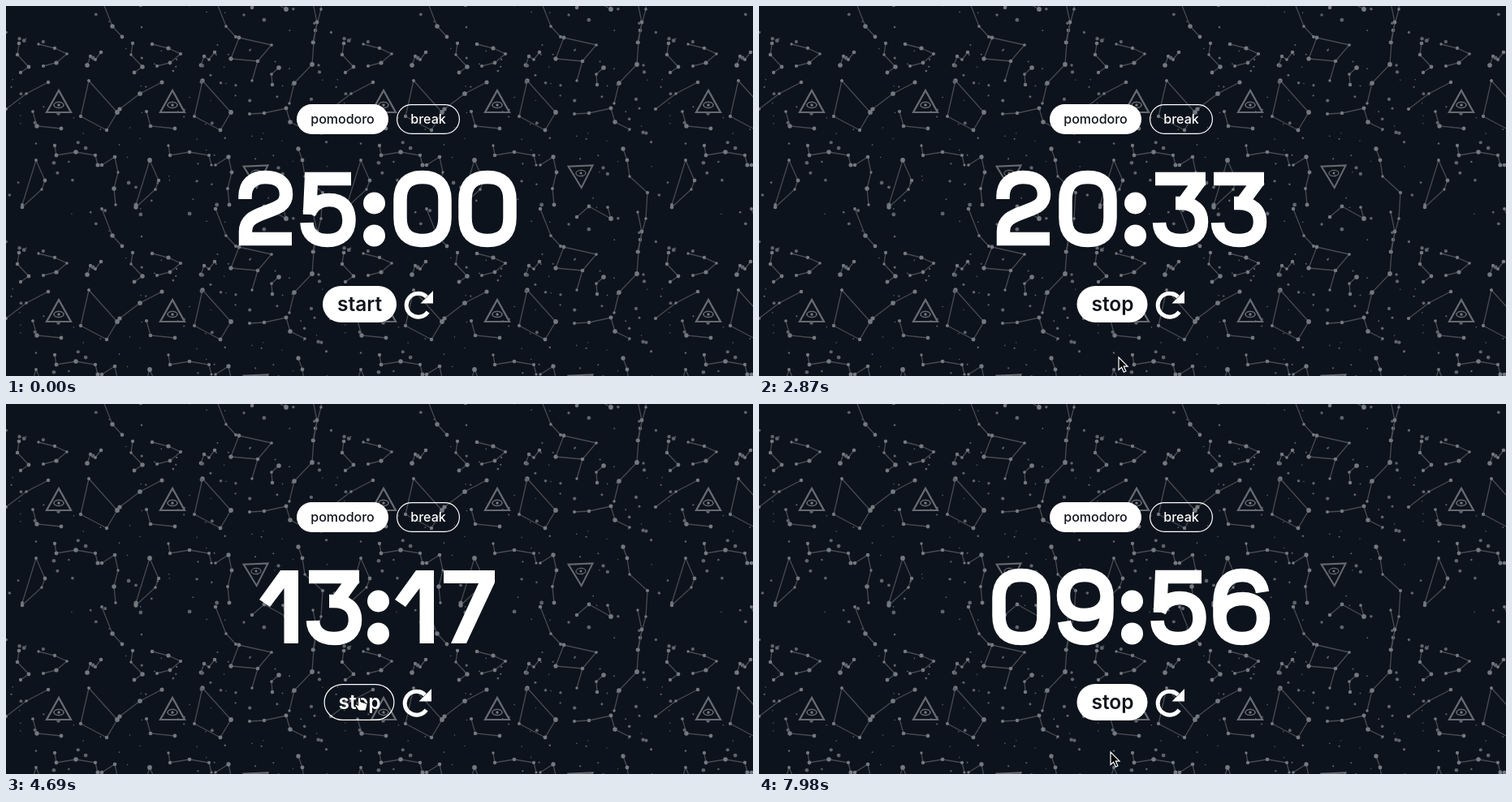
Animation of 920 by 456 pixels, one loop 8 s. Source, as an HTML page with a canvas:

```html
<!DOCTYPE html>
<html lang="en">
<head>
<meta charset="utf-8">
<title>Pomodoro timer</title>
<style>
  html, body { margin: 0; width: 100%; height: 100%; overflow: hidden; background: #0d131c; }
  canvas, svg { position: absolute; left: 0; top: 0; width: 920px; height: 456px; }
  text { font: 500 16px Inter, "Open Sans", sans-serif; text-anchor: middle; fill: #fff; }
  .dark { fill: #10141c; }
  .pill { fill: #fff; }
  .line { fill: none; stroke: #fff; stroke-width: 1.2; }
  #label { font-size: 24.5px; font-weight: 600; fill: #10141c; }
  #btn.hover #label { fill: #fff; }
  #btn.hover .pill { fill: none; stroke: #fff; stroke-width: 1.2; }
  .bold { fill: none; stroke: #fff; stroke-width: 16.5; }
  .solid { fill: #fff; fill-rule: evenodd; }
</style>
</head>
<body>
<canvas id="sky" width="920" height="456"></canvas>
<svg viewBox="0 0 920 456">
  <defs>
    <path id="g0" class="bold" d="M12.5 34C12.5 15 22 6 40 6S67.5 15 67.5 34V56C67.5 75 58 84 40 84S12.5 75 12.5 56Z"/>
    <path id="g1" class="solid" d="M49 0V90H31.5V22L14 45L1 36L27 0Z"/>
    <path id="g2" class="bold" d="M11.5 33V30C11.5 14 21 6 36.5 6S62 13 62 27C62 40 53 43 37 49C20 55 12 60 12 73V82H69"/>
    <path id="g3" class="bold" d="M5 8H67M61 9L39 39M30 38H36C53 38 62 47 62 61C62 76 52 84 36 84C20 84 10.5 76 10 62"/>
    <path id="g4" class="solid" d="M67 0V58H80V73H67V90H50V73H4V56L45 0ZM50 58V20L22 58Z"/>
    <path id="g5" class="bold" d="M66 8H17L15 52M14 51C19 39 28 34 39 34C55 34 63.5 43 63.5 59C63.5 75 53 84 37 84C21 84 12 76 11.5 62"/>
    <path id="g6" class="bold" d="M65 27C63 13 54 6 40 6C22 6 12.5 18 12.5 40V57C12.5 75 23 84 40 84C57 84 66 74 66 59C66 44 56 35 41 35C24 35 13 44 12.5 57"/>
    <use id="g9" href="#g6" transform="rotate(180 39 45)"/>
    <path id="g7" class="solid" d="M4 0H67V15L32 90H13L47 16H4Z"/>
    <g id="g8" class="bold">
      <ellipse cx="39" cy="25" rx="23.5" ry="19"/>
      <ellipse cx="39" cy="63" rx="27.5" ry="21"/>
    </g>
    <g id="colon" class="solid">
      <circle cx="18.5" cy="38" r="13.5"/>
      <circle cx="18.5" cy="78" r="13.5"/>
    </g>
  </defs>

  <rect class="pill" x="358" y="121" width="113" height="37" rx="18.5"/>
  <text class="dark" x="414.5" y="145">pomodoro</text>
  <rect class="line" x="481.6" y="121.6" width="76.8" height="35.8" rx="17.9"/>
  <text x="520" y="145">break</text>

  <g id="timer" role="timer"></g>

  <g id="btn">
    <rect id="pill" class="pill" y="345" height="45" rx="22.5"/>
    <text id="label" x="435.5" y="376"></text>
  </g>
  <g id="reset">
    <path d="M519.6 377A14.5 14.5 0 1 1 518 358.5" fill="none" stroke="#fff" stroke-width="5"/>
    <path d="M526 351V366.5H510.5Z" fill="#fff"/>
  </g>

  <g id="cursor">
    <g id="ring" class="line">
      <circle r="32.3"/>
      <circle r="29.5" opacity=".6"/>
    </g>
    <path id="arrow" d="M0 0V15.5L3.6 12.2L6.3 18.2L8.9 17L6.3 11.2H11Z" fill="#000" stroke="#fff" stroke-width="1.2"/>
    <path id="hand" d="M-1.6 1.5Q0 -.6 1.5 1.5L2 6L9 8Q10.500 9 9.500 12L8 17H-.5L-5 10.500Q-4.500 8 -1.500 10.500Z" fill="#fff" stroke="#000" stroke-width="1"/>
  </g>
</svg>
<script>
const $ = id => document.getElementById(id);

// ---- starry wallpaper: a 400 x 258 tile ----
const left = [   // appears twice per tile, 140 px apart
  [40,47, 60,52, 75,59, 62,70, 46,74],
  [16,46, 14,60, 28,75, 18,82],
  [118,-8, 131,25, 143,38],
  [100,73, 104,62, 110,66, 117,57],
  [0,127, 25,108, 52,94],
  [33,130, 38,148, 68,151],
  [102,92, 92,136, 124,153, 137,131, 102,92],
  [60,172, 62,184, 86,180, 110,184, 113,196],
  [20,245, 37,190, 48,215, 44,226, 20,248],
  [118,196, 134,186, 138,205, 133,225, 135,245]
];
const right = [
  [277,65, 287,39, 327,48, 310,68, 277,65],
  [310,68, 303,92],
  [328,97, 327,84, 336,76],
  [378,-4, 383,20, 379,45, 377,72, 355,95, 349,120],
  [300,133, 318,132, 345,126, 350,143, 368,152],
  [360,176, 365,190, 368,210, 390,230, 388,262, 381,288, 378,303],
  [303,260, 318,247, 345,262, 341,248]
];
const sky = $('sky').getContext('2d');
const DOT = '#75787e', LINE = '#474b52';

function random(seed) {
  return () => (seed = seed * 16807 % 2147483647) / 2147483647;
}
function dot(x, y, r) {
  sky.beginPath();
  sky.arc(x, y, r, 0, 7);
  sky.fill();
}
function constellation(p, dx, rnd) {
  sky.strokeStyle = LINE;
  sky.lineWidth = 1.3;
  sky.beginPath();
  for (let i = 0; i < p.length; i += 2) sky.lineTo(p[i] + dx, p[i + 1]);
  sky.stroke();
  for (let i = 0; i < p.length; i += 2) dot(p[i] + dx, p[i + 1], 1.6 + rnd() * 1.3);
}
function eye(x, y, angle) {
  sky.save();
  sky.translate(x, y);
  sky.rotate(angle);
  sky.strokeStyle = '#666a70';
  sky.lineWidth = 2;
  sky.beginPath();
  sky.moveTo(0, -17);
  sky.lineTo(15, 10);
  sky.lineTo(-15, 10);
  sky.closePath();
  sky.stroke();
  sky.lineWidth = 1.2;
  sky.beginPath();
  sky.ellipse(0, 1, 6, 3.6, 0, 0, 7);
  sky.stroke();
  dot(0, 1, 1.5);
  sky.restore();
}
function tile() {
  const rnd = random(4177);
  sky.fillStyle = DOT;
  for (const dx of [0, 140]) {
    for (const p of left) constellation(p, dx, rnd);
    eye(65, 121, 0) || 0;
    eye(205, 121, 0);
  }
  for (const p of right) constellation(p, 0, rnd);
  eye(308, 207, 3.1);
  sky.fillStyle = '#5f636a';
  for (let i = 0; i < 125; i++) dot(rnd() * 400, rnd() * 258, .7 + rnd() ** 2 * 1.8);
}
sky.fillStyle = '#0d131c';
sky.fillRect(0, 0, 920, 456);
for (let y = -258; y < 456; y += 258)
  for (let x = -400; x < 920; x += 400) {
    sky.setTransform(1, 0, 0, 1, x, y);
    tile();
  }

// ---- animation ----
const LOOP = 8000, STEP = 70;
const count = [   // time, seconds left
  [0, 1500], [1760, 1500], [2380, 1351], [3360, 1114], [4130, 931],
  [4942, 736], [7397, 736], [7980, 596]
];
const pointer = [ // time, x, y
  [0, 504, 462], [70, 503, 450], [770, 413, 354], [910, 448, 382],
  [1050, 484, 374], [1120, 504, 370], [1330, 435, 360], [1890, 435, 360],
  [2380, 443, 433], [4130, 443, 433], [4690, 435, 361], [5110, 435, 361],
  [5460, 441, 421], [5880, 441, 421], [6090, 440, 419], [6230, 441, 420],
  [6300, 441, 420], [7070, 433, 363], [7350, 433, 363], [7770, 434, 429], [7980, 433, 429]
];
const advance = [80, 57, 76, 72, 82, 76, 78, 70, 78, 78];
const smooth = k => k * k * (3 - 2 * k);
const within = (t, a, b) => t >= a && t < b;

function track(keys, t, ease = k => k) {
  const i = keys.findIndex(k => k[0] > t);
  if (i < 0) return keys[keys.length - 1].slice(1);
  const a = keys[i - 1], b = keys[i], k = ease((t - a[0]) / (b[0] - a[0]));
  return a.slice(1).map((v, n) => v + (b[n + 1] - v) * k);
}

let shown;
function showTime(sec) {
  const pad = n => String(n).padStart(2, '0');
  const text = pad(Math.floor(sec / 60)) + ':' + pad(sec % 60);
  if (text === shown) return;
  shown = text;
  const width = c => c === ':' ? 38 : advance[c];
  let x = 458 - [...text].reduce((sum, c) => sum + width(c), 0) / 2;
  $('timer').setAttribute('aria-label', text);
  $('timer').innerHTML = [...text].map(c => {
    const use = `<use href="#${c === ':' ? 'colon' : 'g' + c}" x="${x}" y="205"/>`;
    x += width(c);
    return use;
  }).join('');
}

function show(el, on) {
  $(el).style.display = on ? '' : 'none';
}

function draw(now) {
  const t = Math.floor(now % LOOP / STEP) * STEP;
  const running = within(t, 1680, 4970) || t >= 7350;
  const [x, y] = track(pointer, t, smooth);
  const hover = t > 1120 && within(x, 390, 481) && within(y, 345, 390);

  showTime(Math.round(track(count, t)[0]));
  $('label').textContent = running ? 'stop' : 'start';
  $('btn').setAttribute('class', hover ? 'hover' : '');
  const inset = hover ? .6 : 0;
  $('pill').setAttribute('x', (running ? 391.5 : 390) + inset);
  $('pill').setAttribute('width', (running ? 87 : 91) - 2 * inset);
  $('pill').setAttribute('y', 345 + inset);
  $('pill').setAttribute('height', 45 - 2 * inset);
  $('reset').setAttribute('transform', `translate(${running ? -2 : 0})`);

  $('cursor').setAttribute('transform', `translate(${x.toFixed(1)} ${y.toFixed(1)})`);
  show('hand', hover);
  show('arrow', !hover);
  show('ring', within(t, 1540, 1680) || within(t, 4830, 4970) || within(t, 7210, 7350));
}

const start = performance.now();
function frame() {
  draw(performance.now() - start);
  requestAnimationFrame(frame);
}
draw(0);
requestAnimationFrame(frame);
</script>
</body>
</html>
```
